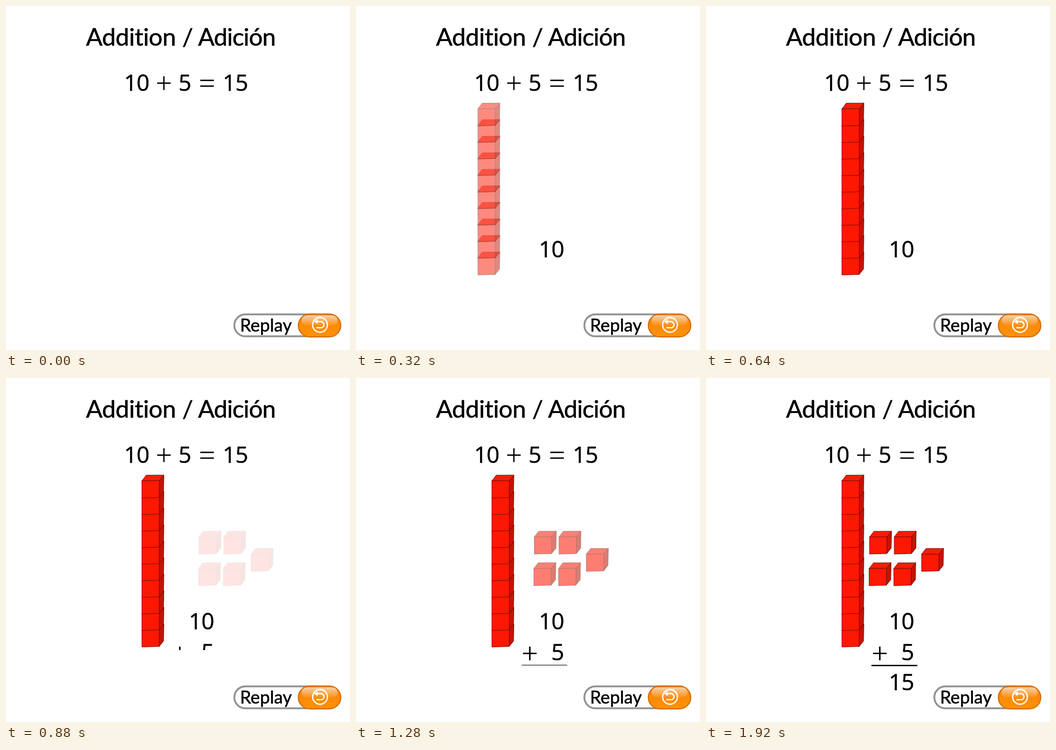
An HTML page for the animation above (2.08 s loop, 746 by 746 pixels).

```html
<!DOCTYPE html>
<html lang="en">
<head>
<meta charset="utf-8">
<title>Addition / Adición</title>
<style>
@property --rod { syntax: '<number>'; inherits: true; initial-value: 0; }
@property --units { syntax: '<number>'; inherits: true; initial-value: -2; }
@property --sum { syntax: '<number>'; inherits: true; initial-value: 0; }

html, body { margin: 0; width: 100%; height: 100%; overflow: hidden; background: #fff; }
svg { display: block; width: 100%; height: 100%; }

/* One tick is 80 ms, 26 ticks per loop; each property counts its own ticks. */
#stage {
  animation: rod 2080ms -1ms infinite, units 2080ms -1ms infinite, sum 2080ms -1ms infinite;
}
@keyframes rod {
  0% { --rod: 0; animation-timing-function: steps(8); }
  30.769%, 100% { --rod: 8; }
}
@keyframes units {
  0% { --units: -2; animation-timing-function: step-end; }
  30.769% { --units: -2; animation-timing-function: steps(4); }
  46.154% { --units: 2; animation-timing-function: step-end; }
  50% { --units: 2; animation-timing-function: steps(7); }
  76.923%, 100% { --units: 9; }
}
@keyframes sum {
  0% { --sum: 0; animation-timing-function: step-end; }
  76.923% { --sum: 0; animation-timing-function: steps(4); }
  92.308%, 100% { --sum: 4; }
}

#rod { transform: translateX(calc((var(--rod) - 8) * 7.6px)); }
#rod use { opacity: calc(var(--rod) / 8); }
#units { transform: translateX(calc((9 - var(--units)) * 8px)); }
#units use { opacity: calc(var(--units) / 9); }

/* White covers slide down to reveal the column sum. */
.cover { fill: #fff; }
#cover10 { transform: translateY(calc(var(--rod) * 9.8px)); }
#cover5 { transform: translateY(calc(var(--units) * 8.3px)); }
#cover15 { transform: translateY(calc(var(--sum) * 9.6px)); }

text { stroke: #000; stroke-width: .6; }
.title { font: 53px Lato, sans-serif; }
.label { font: 38.5px Lato, sans-serif; }
.num { font: 49px "Open Sans", sans-serif; letter-spacing: -.8px; }
.sign { font: 300 62px "Open Sans", sans-serif; text-anchor: middle; }
</style>
</head>
<body>
<svg id="stage" viewBox="0 0 746 746">
  <defs>
    <g id="cube" stroke="#4a0a04" stroke-width=".8" stroke-linejoin="round">
      <path d="M0 12.7 9.5.3 48 0 38 12.3z" fill="#f41d08"/>
      <path d="M38 12.3 48 0 47.3 37 37.7 49z" fill="#c01602"/>
      <path d="M0 12.7 38 12.3 37.7 49 .2 50z" fill="#fc1802"/>
    </g>
    <linearGradient id="orange" x2="0" y2="1">
      <stop offset="0" stop-color="#f08a1c"/>
      <stop offset=".5" stop-color="#fc8a08"/>
      <stop offset="1" stop-color="#ff9208"/>
    </linearGradient>
    <linearGradient id="shine" x2="0" y2="1">
      <stop offset="0" stop-color="#fff" stop-opacity=".6"/>
      <stop offset="1" stop-color="#fff" stop-opacity=".05"/>
    </linearGradient>
  </defs>

  <g class="title">
    <text x="173.5" y="86" letter-spacing="-.5">Addition</text>
    <text x="394" y="86" text-anchor="middle">/</text>
    <text x="416.5" y="86" letter-spacing="-1.1">Adición</text>
  </g>

  <text class="num" x="256" y="184">10</text>
  <text class="sign" x="342.5" y="189.5">+</text>
  <text class="num" x="374" y="184">5</text>
  <text class="sign" x="436" y="190">=</text>
  <text class="num" x="470" y="184">15</text>

  <text class="num" x="396.5" y="545">10</text>
  <rect id="cover10" class="cover" x="395" y="508" width="60" height="42"/>

  <text class="sign" x="377" y="619.5">+</text>
  <text class="num" x="423.5" y="612">5</text>
  <path d="M360 623.5H457" stroke="#000" stroke-width="3" stroke-linecap="round"/>
  <rect id="cover5" class="cover" x="355" y="581.7" width="108" height="70"/>

  <text class="num" x="396.5" y="677">15</text>
  <rect id="cover15" class="cover" x="395" y="640" width="60" height="42"/>

  <g id="rod"></g>
  <g id="units"></g>

  <rect x="495.2" y="668.8" width="200" height="47.5" rx="23.7" fill="#fff" stroke="#929292" stroke-width="4"/>
  <text class="label" x="507.5" y="706">Replay</text>
  <rect x="634" y="668" width="92" height="49.5" rx="24.7" fill="url(#orange)" stroke="#d56a04" stroke-width="2.4"/>
  <rect x="641" y="671" width="78" height="22" rx="11" fill="url(#shine)"/>
  <g fill="none" stroke="#fff" stroke-width="2.8">
    <circle cx="681" cy="691.5" r="16"/>
    <path d="M673 684.5H683a6.6 6.6 0 0 1 0 13.2H673"/>
    <path d="M668.5 684.5 676 679V690z" fill="#fff" stroke="none"/>
  </g>
</svg>
<script>
const addCube = (id, x, y) => {
  const cube = document.createElementNS('http://www.w3.org/2000/svg', 'use');
  cube.setAttribute('href', '#cube');
  cube.setAttribute('x', x);
  cube.setAttribute('y', y);
  document.getElementById(id).append(cube);
};
// Stack from the bottom so each cube hides the top of the one below.
for (let i = 9; i >= 0; i--) addCube('rod', 294.5, 210.3 + 35.9 * i);
[[354.5, 332], [408, 332], [467.3, 369.4], [353.5, 400.5], [407, 400.5]]
  .forEach(([x, y]) => addCube('units', x, y));
</script>
</body>
</html>
```
